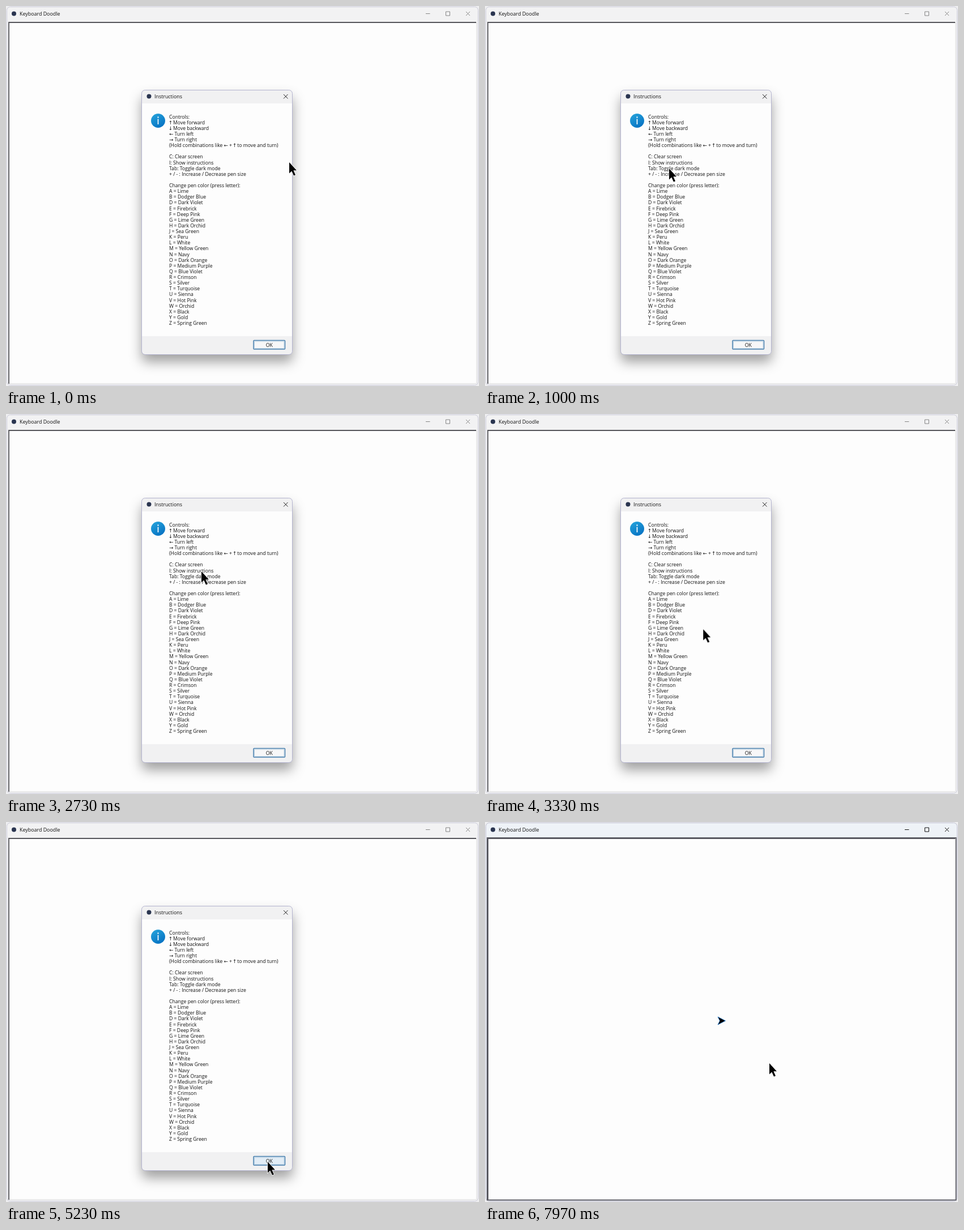
An HTML page that plays this animation: 835 by 671 pixels, repeating every 8000 ms.

```html
<!DOCTYPE html>
<html lang="en">
<head>
<meta charset="utf-8">
<title>Keyboard Doodle</title>
<style>
  html, body { margin: 0; width: 100%; height: 100%; overflow: hidden; background: #eeeef0; }
  svg { display: block; width: 100%; height: 100%; }
  text { font: 8.65px "Open Sans", "Noto Sans", "DejaVu Sans", sans-serif; fill: #111; white-space: pre; }
  .title { font-size: 8.9px; }
  .line { fill: none; stroke: currentColor; }
  .inactive { color: #858585; }
  .active { color: #111; }
  .inactive .title { fill: #858585; }

  .inactive, .dialog { animation: leave 8s step-end infinite; }
  .active { animation: enter 8s step-end infinite; }
  .hover { animation: hover 8s step-end infinite; }
  .turtle { animation: turtle 8s step-end infinite; }
  .cursor { animation: cursor 8s ease-in-out infinite; }

  @keyframes leave { 0% { visibility: visible } 70%, 100% { visibility: hidden } }
  @keyframes enter { 0% { visibility: hidden } 70%, 100% { visibility: visible } }
  @keyframes hover { 0% { fill: #f7f7f8 } 61%, 100% { fill: #e2edf6 } }
  @keyframes turtle {
    0% { stroke: #e6d800; transform: none }
    84.625% { stroke: #1e78d0; transform: none }
    99.625%, 100% { stroke: #1e78d0; transform: translateX(4px) }
  }
  @keyframes cursor {
    0%, .3% { transform: translate(500px, 276px) }
    12.5% { transform: translate(325px, 287px) }
    19.1%, 21.2% { transform: translate(329px, 286px) }
    31.2%, 34.125% { transform: translate(345px, 278px) }
    51.625% { transform: translate(451px, 547px) }
    62.5%, 70.5% { transform: translate(462px, 600px) }
    79.125%, 100% { transform: translate(502px, 426px) }
  }
</style>
</head>
<body>
<svg viewBox="0 0 835 671" preserveAspectRatio="none">
  <defs>
    <linearGradient id="blue" x2=".6" y2="1">
      <stop stop-color="#27a6dc"/><stop offset="1" stop-color="#0874c4"/>
    </linearGradient>
    <filter id="shadow" filterUnits="userSpaceOnUse" x="180" y="90" width="390" height="581">
      <feDropShadow dx="0" dy="13" stdDeviation="11" flood-opacity=".38"/>
    </filter>
    <g id="caption">
      <circle cx="14" cy="13.5" r="4" fill="#2a3550"/>
      <text class="title" x="24" y="16.8">Keyboard Doodle</text>
      <path class="line" d="M741 13.5h7.5M776.5 10h7v7h-7zM812 10l7 7m0-7l-7 7"/>
    </g>
  </defs>

  <g class="inactive">
    <rect x="1.5" y="1.5" width="832" height="668" rx="6" fill="#f2f2f3" stroke="#cacad8"/>
    <rect x="4" y="28" width="827" height="639" fill="#fdfdfd"/>
    <path d="M830.5 29V666.5H5" fill="none" stroke="#e2e2e3"/>
    <path d="M830 29H5V667" fill="none" stroke="#55555b" stroke-width="1.8"/>
    <use href="#caption"/>
  </g>

  <g class="active">
    <rect x="1.5" y="1.5" width="832" height="668" rx="6" fill="#eef2f7" stroke="#c0c0d0"/>
    <rect x="4" y="28" width="827.5" height="639.5" fill="#fdfdfd" stroke="#62626a" stroke-width="2"/>
    <path d="M830 29.2H5.2V667" fill="none" stroke="#505058" stroke-width="1.6"/>
    <use href="#caption"/>
    <path class="turtle" d="M407 344L420.5 351L407 358L410.5 351Z" stroke-width=".8"/>
  </g>

  <g class="dialog">
    <rect x="240" y="149" width="265.5" height="466" rx="5.5" fill="#f1f1f2" filter="url(#shadow)"/>
    <rect x="240" y="172" width="265.5" height="411" fill="#fdfdfd"/>
    <rect x="239.5" y="148.5" width="266" height="467" rx="6" fill="none" stroke="#b3b3cf"/>
    <circle cx="252.5" cy="159.5" r="4" fill="#2a3550"/>
    <text class="title" x="262" y="163.2">Instructions</text>
    <path d="M490 156l7.5 7.5m0-7.5l-7.5 7.5" stroke="#222"/>
    <circle cx="268.5" cy="202.5" r="12.5" fill="url(#blue)"/>
    <path d="M268.5 199.5v9.5" stroke="#fff" stroke-width="1.7"/>
    <circle cx="268.5" cy="196.4" r="1.2" fill="#fff"/>
    <g id="help"></g>
    <rect class="hover" x="437" y="590.5" width="55.5" height="15.5" rx="1" stroke="#477fad" stroke-width="1.5"/>
    <rect x="438.7" y="592.2" width="52.1" height="12.1" fill="none" stroke="#a9c6dc" stroke-width=".7"/>
    <text x="464.7" y="601.7" text-anchor="middle">OK</text>
  </g>

  <path class="cursor" d="M0 0V19.5L4.3 15.4L8 23.6L11 22.2L7.4 14.2H13Z"
        stroke="#fdfdfd" stroke-width="1.6" paint-order="stroke"/>
</svg>

<script>
  const controls = [
    "Controls:", "↑ Move forward", "↓ Move backward", "← Turn left", "→ Turn right",
    "(Hold combinations like ← + ↑ to move and turn)", "",
    "C: Clear screen", "I: Show instructions", "Tab: Toggle dark mode",
    "+ / - : Increase / Decrease pen size", "", "Change pen color (press letter):"
  ];
  const colors = ("A Lime,B Dodger Blue,D Dark Violet,E Firebrick,F Deep Pink,G Lime Green,H Dark Orchid," +
    "J Sea Green,K Peru,L White,M Yellow Green,N Navy,O Dark Orange,P Medium Purple,Q Blue Violet," +
    "R Crimson,S Silver,T Turquoise,U Sienna,V Hot Pink,W Orchid,X Black,Y Gold,Z Spring Green")
    .split(",").map(entry => entry.replace(" ", " = "));

  // Vertical arrows sit closer to their neighbours than the fallback glyph does.
  const tighten = line => line.replace(/([↑↓])(.*)/, '<tspan dx="-1.2">$1</tspan><tspan dx="-1.2">$2</tspan>');

  document.getElementById("help").innerHTML = [...controls, ...colors]
    .map((line, i) => `<text x="288" y="${198.6 + i * 10.125}">${tighten(line)}</text>`)
    .join("");
</script>
</body>
</html>
```
